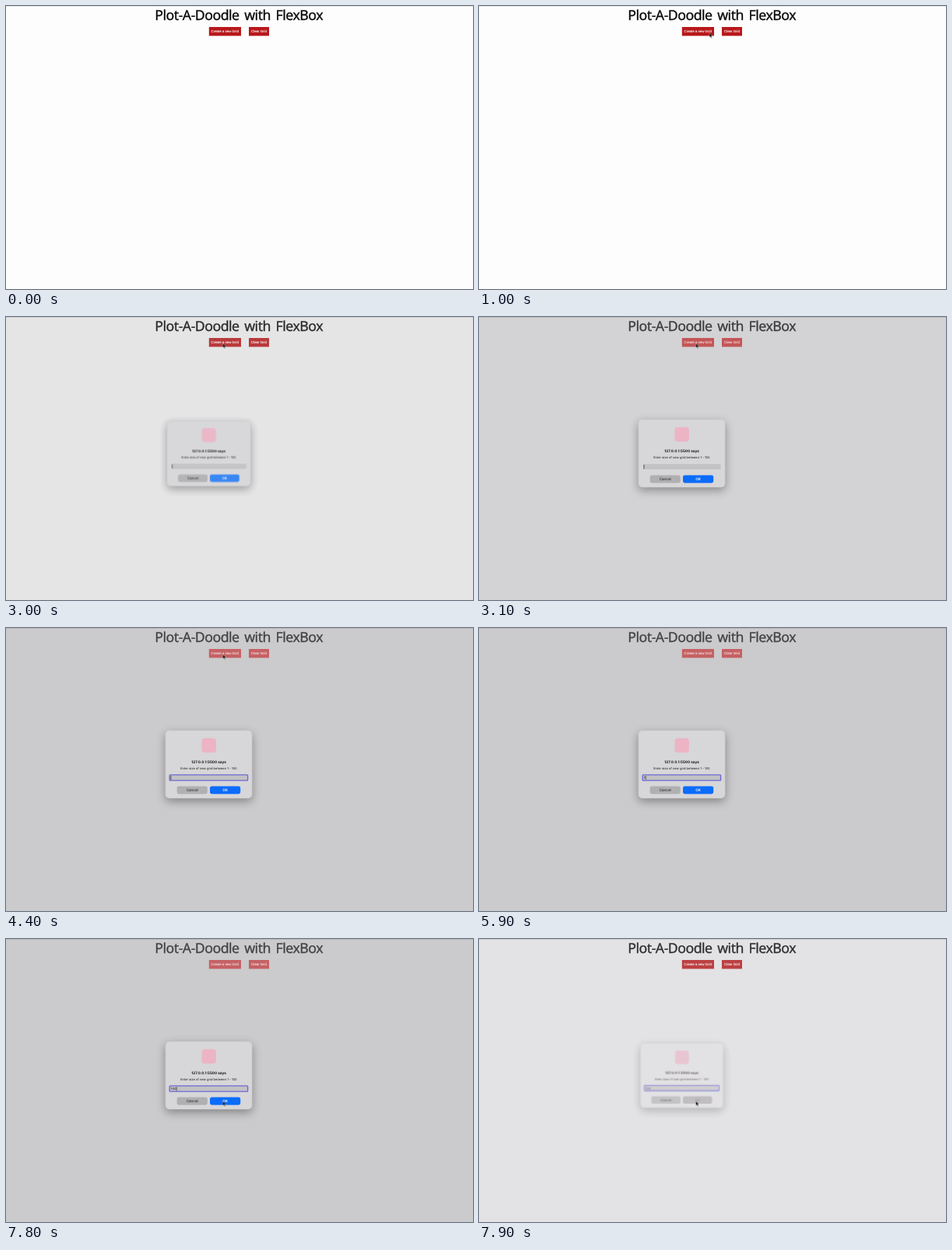
Recreate the animation shown at these times as an HTML page. Size 600 by 364 pixels, loop 8000 ms.

```html
<!DOCTYPE html>
<html lang="en">
<head>
<meta charset="utf-8">
<title>Grid prompt</title>
<style>
html, body { margin: 0; width: 100%; height: 100%; overflow: hidden; }
svg { display: block; width: 100vw; height: 100vh; }
text { font-family: Inter, sans-serif; fill: #161617; text-rendering: geometricPrecision; }
.mid { text-anchor: middle; }

/* every part shares one 8 s clock with hard steps: 1.25% = 100 ms */
svg * { animation: 8s step-end infinite; }

#page { animation-name: page; }
@keyframes page {
  0% { fill: #fefdfe; }
  37.5% { fill: #e5e5e6; }
  38.75% { fill: #d3d2d4; }
  40%, 97.5% { fill: #cbcacc; }
  98.75%, 100% { fill: #e3e2e4; }
}

#heading {
  font: 17.7px "Noto Sans", sans-serif;
  letter-spacing: -.5px;
  word-spacing: 2.5px;
  text-anchor: end;
  stroke-width: .3;
  animation-name: heading;
}
@keyframes heading {
  0% { fill: #080808; stroke: #080808; }
  37.5% { fill: #2a2a2b; stroke: #2a2a2b; }
  38.75% { fill: #3c3c3d; stroke: #3c3c3d; }
  40%, 97.5% { fill: #434344; stroke: #434344; }
  98.75%, 100% { fill: #2e2e2f; stroke: #2e2e2f; }
}

#buttons rect { animation-name: button; }
@keyframes button {
  0% { fill: #b8181b; }
  37.5% { fill: #b93a3c; }
  38.75% { fill: #c45658; }
  40%, 97.5% { fill: #c56164; }
  98.75%, 100% { fill: #bc4043; }
}
#buttons text {
  font: 4.35px "Liberation Sans", Arial, sans-serif;
  fill: #fff;
  stroke: #fff;
  stroke-width: .1;
  animation-name: label;
}
@keyframes label {
  0% { opacity: 1; }
  38.75%, 97.5% { opacity: .82; }
  98.75%, 100% { opacity: .95; }
}

#dialog { transform-origin: 260.5px 175.5px; animation-name: dialog; }
@keyframes dialog {
  0% { opacity: 0; transform: scale(.965); }
  37.5% { opacity: .92; transform: scale(.965); }
  38.75%, 97.5% { opacity: 1; transform: none; }
  98.75%, 100% { opacity: .6; transform: scale(.955); }
}
#panel {
  stroke: #c2c1c3;
  stroke-width: .4;
  filter: drop-shadow(0 4px 6px rgba(0, 0, 0, .34));
  animation-name: panel;
}
@keyframes panel {
  0% { fill: #d7d6d8; }
  98.75%, 100% { fill: #e2e1e3; }
}
#ok { animation-name: ok; }
@keyframes ok {
  0% { fill: #2b7ff6; }
  38.75% { fill: #0b6cfa; }
  98.75%, 100% { fill: #a8a7a9; }
}
#okText { animation-name: okText; }
@keyframes okText {
  0% { fill: #fff; }
  98.75%, 100% { fill: #777678; }
}
#ring { animation-name: ring; }
@keyframes ring {
  0% { visibility: hidden; }
  41.25%, 100% { visibility: visible; }
}

#d1 { animation-name: first; }
#d2 { animation-name: second; }
#d3 { animation-name: third; }
@keyframes first { 0% { visibility: hidden; } 70%, 100% { visibility: visible; } }
@keyframes second { 0% { visibility: hidden; } 77.5%, 100% { visibility: visible; } }
@keyframes third { 0% { visibility: hidden; } 82.5%, 100% { visibility: visible; } }

#caret { animation-name: caret; }
@keyframes caret {
  0% { opacity: 1; transform: none; }
  46.25% { opacity: 0; transform: none; }
  52.5% { opacity: 1; transform: none; }
  58.75% { opacity: 0; transform: none; }
  65% { opacity: 1; transform: none; }
  70% { opacity: 1; transform: translateX(2.2px); }
  77.5% { opacity: 1; transform: translateX(4.7px); }
  82.5% { opacity: 1; transform: translateX(7.2px); }
  98.75%, 100% { opacity: 0; transform: translateX(7.2px); }
}

#pointer { animation-name: pointer; }
@keyframes pointer {
  0% { opacity: 0; transform: translate(152.5px, 138px); }
  3.75% { opacity: 1; transform: translate(152.5px, 138px); }
  7.5% { opacity: 1; transform: translate(170px, 114px); }
  8.75% { opacity: 1; transform: translate(214px, 74px); }
  10% { opacity: 1; transform: translate(262px, 46px); }
  11.25% { opacity: 1; transform: translate(288px, 36.5px); }
  12.5% { opacity: 1; transform: translate(296px, 34.5px); }
  17.5% { opacity: 1; transform: translate(291px, 33.5px); }
  28.75% { opacity: 1; transform: translate(283px, 34px); }
  30% { opacity: 1; transform: translate(278.6px, 33.8px); }
  70% { opacity: 0; transform: translate(278.6px, 33.8px); }
  87.5% { opacity: 1; transform: translate(279px, 52px); }
  88.75% { opacity: 1; transform: translate(281px, 108px); }
  90% { opacity: 1; transform: translate(281px, 168px); }
  91.25% { opacity: 1; transform: translate(279.5px, 201px); }
  92.5%, 100% { opacity: 1; transform: translate(278.6px, 208.5px); }
}
</style>
</head>
<body>
<svg viewBox="0 0 600 364">
  <rect id="page" width="600" height="364"/>
  <rect width="600" height="1" fill="#000" opacity=".1"/>

  <text id="heading" x="407" y="17.8">Plot-A-Doodle with FlexBox</text>

  <g id="buttons">
    <rect x="260.8" y="27" width="41.2" height="11.4"/>
    <rect x="312" y="27" width="26" height="11.4"/>
    <text class="mid" x="281.2" y="34.1">Create a new Grid</text>
    <text class="mid" x="325" y="34.1">Clear Grid</text>
  </g>

  <g id="dialog">
    <rect id="panel" x="204.8" y="131.8" width="111.4" height="87.2" rx="5"/>
    <rect x="251.5" y="141.8" width="18.4" height="18.4" rx="4" fill="#ecb4c5"/>
    <text class="mid" x="260.6" y="173.6" font-size="4.7" font-weight="700">127.0.0.1:5500 says</text>
    <text class="mid" x="260.4" y="182.4" font-size="4.03">Enter size of new grid between 1 - 100</text>

    <rect x="211" y="189.2" width="99.4" height="6.8" fill="#c3c2c4"/>
    <rect id="ring" x="210.2" y="188.9" width="100.4" height="7.2" rx=".8" fill="none" stroke="#6a69d6" stroke-width="1.4"/>
    <text x="211.8" y="194.1" font-size="4.1"><tspan id="d1">1</tspan><tspan id="d2">0</tspan><tspan id="d3">0</tspan></text>
    <rect id="caret" x="211.6" y="190" width=".7" height="5.3" fill="#222"/>

    <rect x="219.6" y="203.4" width="39.2" height="10" rx="2.4" fill="#b0afb1"/>
    <rect id="ok" x="262" y="203.4" width="39.2" height="10" rx="2.4"/>
    <text class="mid" x="239.2" y="210.1" font-size="4.6">Cancel</text>
    <text id="okText" class="mid" x="281.6" y="210.1" font-size="4.6" font-weight="600">OK</text>
  </g>

  <path id="pointer" d="M0 0V5.8L1.3 4.6 2.3 6.7 3.3 6.3 2.3 4.3H4Z" fill="#000" stroke="#fff" stroke-width=".35"/>
</svg>
</body>
</html>
```
